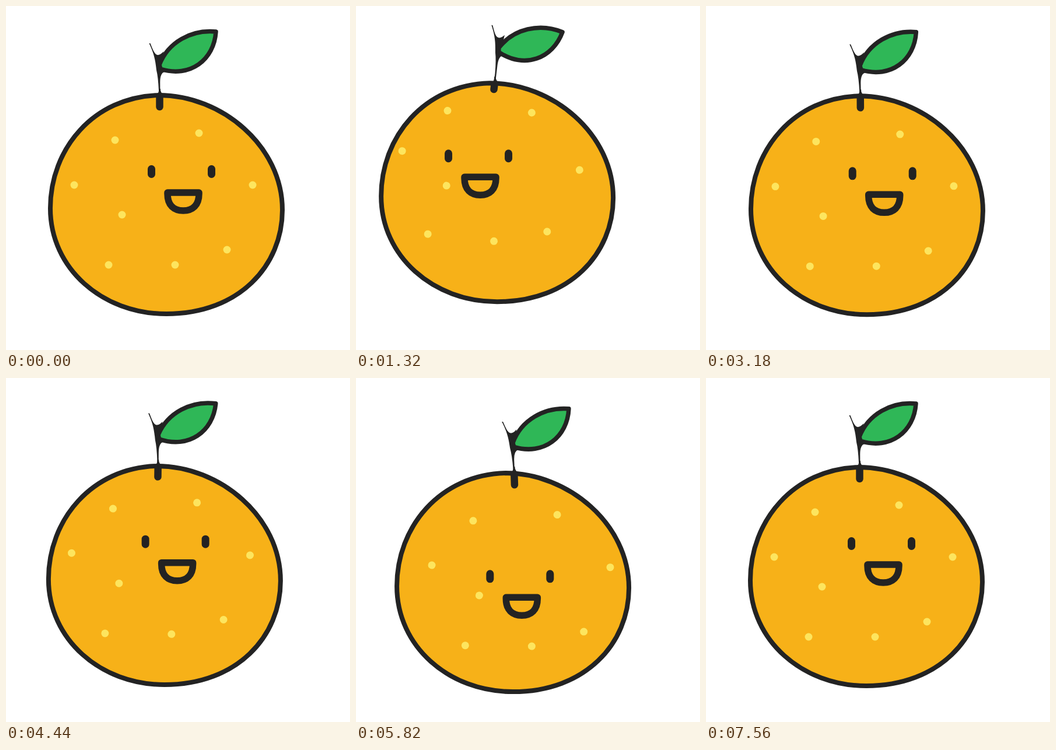
Animation of 590 by 590 pixels, one loop 7.98 s. Source, as an HTML page:

```html
<!DOCTYPE html>
<html lang="en">
<head>
<meta charset="utf-8">
<title>Orange</title>
<style>
html, body { margin: 0; width: 100%; height: 100%; overflow: hidden; background: #fff; }
svg { display: block; width: 100vw; height: 100vh; }
.ink { fill: none; stroke: #232323; stroke-linecap: round; stroke-linejoin: round; }
.solid { fill: #232323; }
</style>
</head>
<body>
<svg viewBox="0 0 590 590">
  <path id="body" class="ink" style="fill:#f7b118" stroke-width="8"
    d="M262 153C370 153 474 240 474 350C474 445 400 528 275 528C165 528 76 450 76 347C76 245 150 156 262 153Z"/>
  <g id="seeds" fill="#fde55e"></g>
  <line id="stalk" class="ink" stroke-width="12.5"/>
  <path id="flare" class="solid" d="M-7 4Q-1 2 -1.2 -7H1.4Q1 0 8 4Z"/>
  <g id="stem">
    <path class="solid" d="M245.5 64H247.5C252 75 255 84 261 84Q266 83 270 78L267 111L272 113Q264 115 264.3 132L264.6 166H261.8L262 145Q261 122 258 110C256 92 254 82 245.5 64Z"/>
    <g id="leaf">
      <path class="ink" style="fill:#2fb757" stroke-width="7.5"
        d="M263 101C278 62 318 40 360 44C357 92 316 124 265 108Z"/>
    </g>
  </g>
  <g id="face" class="ink">
    <path stroke-width="13" d="M249.5 279.5V288.5M352.5 279.5V288.5"/>
    <path stroke-width="11.5" d="M277 320H331V322C331 342 320 351 304 351C288 351 277 342 277 322Z"/>
  </g>
</svg>
<script>
const LOOP = 7980, SWAY = LOOP / 2, STEP = 60;
const RIGHT_TIME = 2190, REST_TIME = 3440;
const el = id => document.getElementById(id);
const deg = Math.PI / 180;

// Poses are [x, y, degrees]; bend bows the way from left to right.
const layers = {
  body:  { leftTime: 1270, left: [-33, -21, 0], right: [28, 36, 0], bend: [-6, 6, 0] },
  seeds: { leftTime: 1190, left: [-44, -43.5, 6.3], right: [58.8, 64.3, -3.9], bend: [0, 0, 0] },
  stem:  { leftTime: 1200, left: [-28, -31, 7.5], right: [39, 45, -10], bend: [0, 0, 0] },
  leaf:  { leftTime: 1200, left: [0, 0, 9.5], right: [0, 0, -6], bend: [0, 0, 0] },
  face:  { leftTime: 1190, left: [-93, -30, 0], right: [50, 97, 0], bend: [-11, 33, 0] }
};
const REST = [0, 0, 0];

const spots = [[187, 230], [331, 218], [117, 307], [423, 307],
  [199, 358], [379, 418], [176, 444], [290, 444]];
el('seeds').innerHTML = spots.map(([x, y]) => `<circle cx="${x}" cy="${y}" r="6.5"/>`).join('');

// Easing curve with handles (x1, 0) and (x2, 1).
function ease(u, x1, x2) {
  if (u <= 0) return 0;
  if (u >= 1) return 1;
  let lo = 0, hi = 1;
  for (let i = 0; i < 24; i++) {
    const s = (lo + hi) / 2, r = 1 - s;
    if (3 * r * r * s * x1 + 3 * r * s * s * x2 + s * s * s < u) lo = s; else hi = s;
  }
  return lo * lo * (3 - 2 * lo);
}

const mix = (a, b, p) => a.map((v, i) => v + (b[i] - v) * p);

function pose({ leftTime, left, right, bend }, t) {
  if (t < leftTime) return mix(REST, left, ease(t / leftTime, 0.8, 0.55));
  if (t < RIGHT_TIME) {
    const p = ease((t - leftTime) / (RIGHT_TIME - leftTime), 0.6, 0.7);
    return mix(left, right, p).map((v, i) => v + 2 * p * (1 - p) * bend[i]);
  }
  return mix(right, REST, ease((t - RIGHT_TIME) / (REST_TIME - RIGHT_TIME), 0.33, 0.3));
}

function place(id, [x, y, angle], cx = 0, cy = 0) {
  el(id).setAttribute('transform', `translate(${x} ${y}) rotate(${angle} ${cx} ${cy})`);
}

function draw(time) {
  const t = Math.floor(time % LOOP / STEP) * STEP % SWAY;
  const at = {};
  for (const id in layers) at[id] = pose(layers[id], t);
  place('body', at.body);
  place('face', at.face);
  place('seeds', at.seeds, 275, 340);
  place('stem', at.stem, 263, 173);
  place('leaf', at.leaf, 262, 100);

  // The stalk runs from its foot to wherever its axis meets the rim.
  const footX = 263.5 + at.stem[0], footY = 173 + at.stem[1];
  const axisX = y => footX + Math.tan(at.stem[2] * deg) * (footY - y);
  const rimY = 156 + at.body[1];
  const ends = { x1: footX, y1: footY, x2: axisX(rimY), y2: rimY };
  for (const key in ends) el('stalk').setAttribute(key, ends[key]);
  place('flare', [axisX(rimY - 7), rimY - 7, 0]);
}

function tick() {
  draw(performance.now());
  requestAnimationFrame(tick);
}
tick();
</script>
</body>
</html>
```
